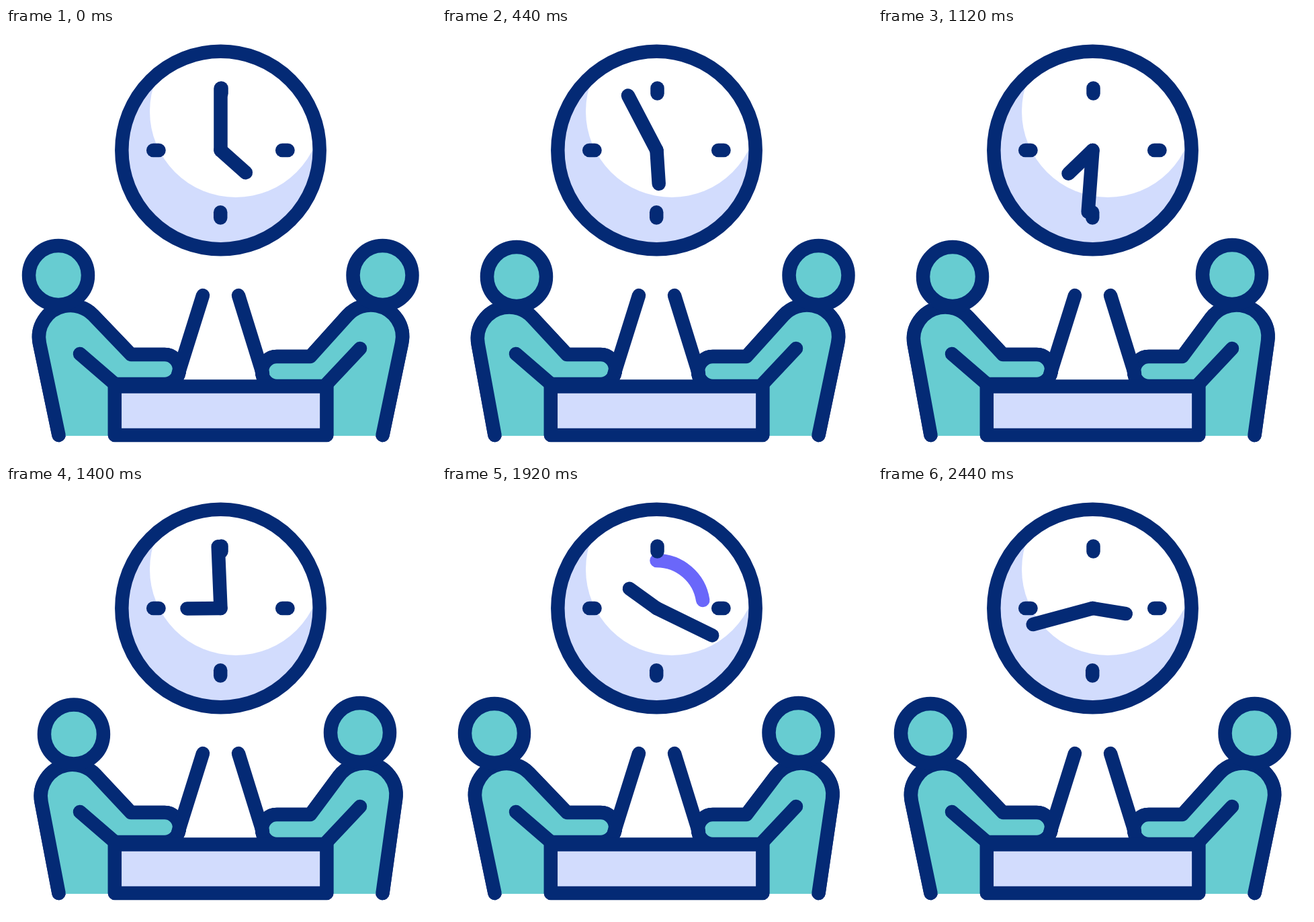
Animation, 640 px wide and 640 px high, one loop 2480 ms. Source, as an HTML page with a canvas:

```html
<!DOCTYPE html>
<html lang="en">
<head>
<meta charset="utf-8">
<title>Meeting time</title>
<style>
  html, body { margin: 0; width: 100%; height: 100%; overflow: hidden; background: #fff; }
  canvas { display: block; width: 100vw; height: 100vh; }
</style>
</head>
<body>
<canvas id="stage" width="640" height="640"></canvas>
<script>
const ctx = document.getElementById('stage').getContext('2d');
const NAVY = '#042a75', TEAL = '#67ccd1', PALE = '#d2dcfd', PURPLE = '#6a67fa';
const LOOP = 2480, STEP = 40, WIDTH = 20.5;
const TAU = Math.PI * 2;
const CLOCK = { x: 319.5, y: 182 };

// Eased progress from 0 to 1 between two times
function ease(t, from, to) {
  const p = Math.min(1, Math.max(0, (t - from) / (to - from)));
  return p * p * (3 - 2 * p);
}

function line(x1, y1, x2, y2) {
  ctx.beginPath();
  ctx.moveTo(x1, y1);
  ctx.lineTo(x2, y2);
  ctx.stroke();
}

function disc(x, y, r, fill) {
  ctx.beginPath();
  ctx.arc(x, y, r, 0, TAU);
  ctx.fillStyle = fill;
  ctx.fill();
}

// Angle at which a tangent from (x, y) touches a circle; side is 1 or -1
function tangent(x, y, c, side) {
  const dx = x - c.x, dy = y - c.y;
  return Math.atan2(dy, dx) + side * Math.acos(c.r / Math.hypot(dx, dy));
}

function hand(degrees, length) {
  const a = degrees * Math.PI / 180;
  line(CLOCK.x, CLOCK.y, CLOCK.x + length * Math.sin(a), CLOCK.y - length * Math.cos(a));
}

function clock(t) {
  const { x, y } = CLOCK;
  disc(x, y, 147, PALE);
  ctx.save();
  ctx.beginPath();
  ctx.arc(x, y, 147, 0, TAU);
  ctx.clip();
  disc(342, 124, 128, '#fff');
  ctx.restore();

  const head = ease(t, 1760, 2280), tail = ease(t, 2084, 2424);
  if (head > tail) {
    ctx.strokeStyle = PURPLE;
    ctx.beginPath();
    ctx.arc(x, y - 1.5, 69.5, tail * TAU - TAU / 4, head * TAU - TAU / 4);
    ctx.stroke();
  }

  ctx.strokeStyle = NAVY;
  ctx.beginPath();
  ctx.arc(x, y, 147.2, 0, TAU);
  ctx.stroke();

  line(320.5, 89.5, 320.5, 97.5);
  line(319.2, 274.2, 319.2, 282.5);
  line(219.2, y, 227.5, y);
  line(411.2, y, 419.5, y);

  const a = ease(t, 0, 530), b = ease(t, 800, 1430), c = ease(t, 1658, 2688);
  hand(360 * (a + b + 2 * c), 92);
  hand(131.7 + 48.3 * a + 90 * b + 221.7 * c, 50);
}

// A seated figure facing right
function person(pose) {
  const { head, shoulder, elbowY, arm } = pose;
  const c = { ...shoulder, r: 47 };
  const footX = 78.5, footY = 606;

  ctx.beginPath();
  ctx.moveTo(footX, footY);
  ctx.arc(c.x, c.y, c.r, tangent(footX, footY, c, 1), tangent(186, elbowY, c, -1));
  ctx.lineTo(186, elbowY);
  ctx.arc(236, elbowY + 22, 22, -TAU / 4, TAU / 4);
  ctx.lineTo(162, elbowY + 44);
  ctx.strokeStyle = NAVY;
  const outline = () => ctx.stroke();
  ctx.save();
  outline();
  ctx.lineTo(162, 607);
  ctx.lineTo(footX, 607);
  ctx.fillStyle = TEAL;
  ctx.fill();
  ctx.restore();

  ctx.beginPath();
  ctx.moveTo(footX, footY);
  ctx.arc(c.x, c.y, c.r, tangent(footX, footY, c, 1), tangent(186, elbowY, c, -1));
  ctx.lineTo(186, elbowY);
  ctx.arc(236, elbowY + 22, 22, -TAU / 4, TAU / 4);
  ctx.lineTo(162, elbowY + 44);
  outline();
  line(arm.x, arm.y, 161, 529);

  disc(head.x, head.y, 44, TEAL);
  ctx.stroke();
}

function mirrored(draw) {
  ctx.save();
  ctx.translate(639, 0);
  ctx.scale(-1, 1);
  draw();
  ctx.restore();
}

function people(t) {
  const left = ease(t, 0, 400) - ease(t, 1180, 1780);
  const right = ease(t, 520, 910) - ease(t, 1800, 2400);
  person({
    head: { x: 78 + 33 * left, y: 368 + 2 * left },
    shoulder: { x: 96 + 4 * left, y: 460 + 2.5 * left },
    elbowY: 486,
    arm: { x: 110, y: 485 }
  });
  mirrored(() => person({
    head: { x: 78.5 + 33.5 * right, y: 368 - right },
    shoulder: { x: 96 + 9.5 * right, y: 459.5 },
    elbowY: 489,
    arm: { x: 112, y: 477 }
  }));
}

function desk() {
  line(293, 398, 256, 516);
  line(346, 398, 382, 514);
  ctx.beginPath();
  ctx.rect(161.8, 533.4, 315.6, 72.6);
  ctx.fillStyle = PALE;
  ctx.fill();
  ctx.stroke();
}

function render(t) {
  ctx.fillStyle = '#fff';
  ctx.fillRect(0, 0, 640, 640);
  ctx.lineWidth = WIDTH;
  ctx.lineCap = ctx.lineJoin = 'round';
  clock(t);
  people(t);
  desk();
}

const start = performance.now();
function tick() {
  const t = (performance.now() - start) % LOOP;
  render(Math.floor(t / STEP) * STEP);
  requestAnimationFrame(tick);
}
tick();
</script>
</body>
</html>
```
